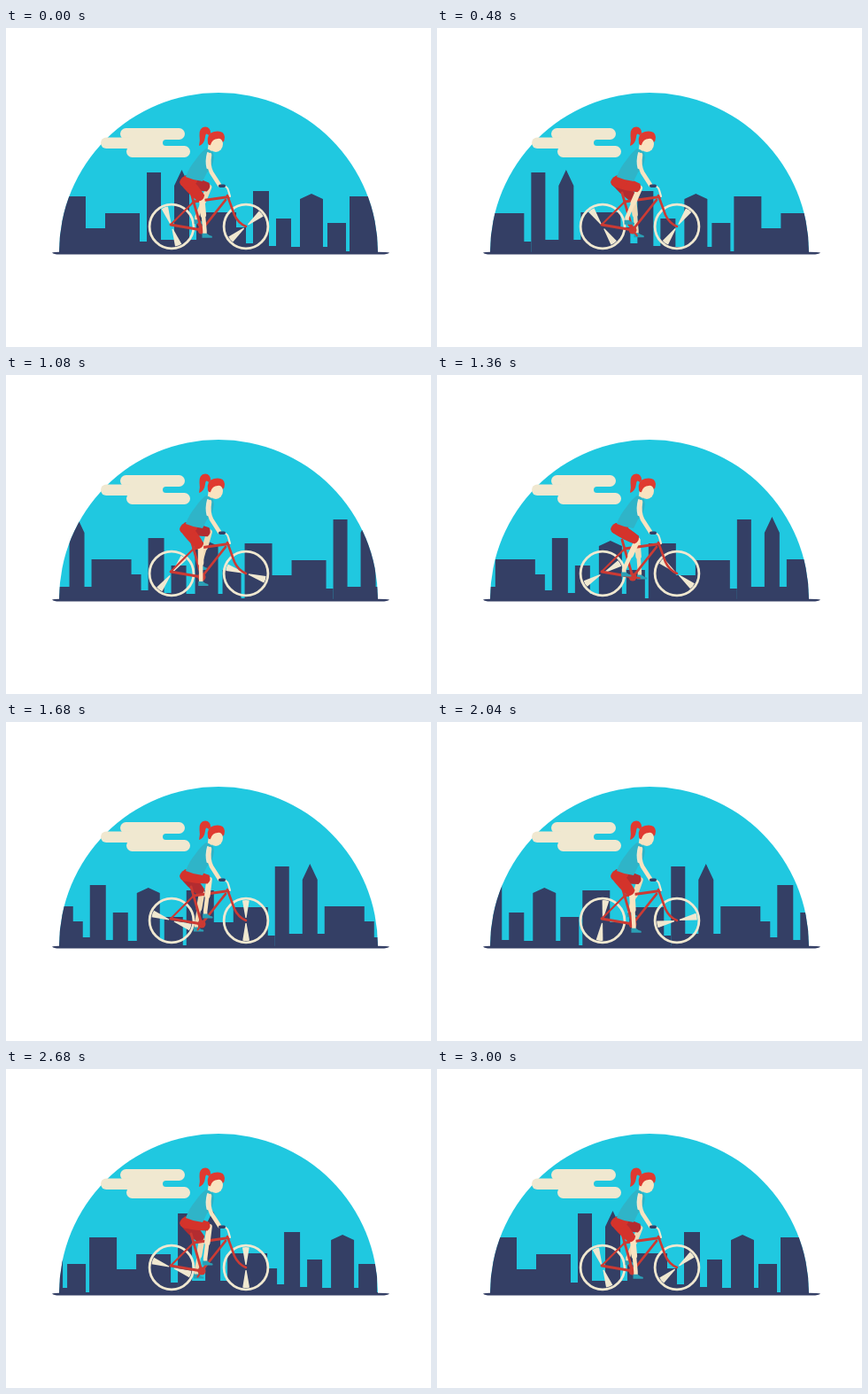
An HTML page with a canvas for the animation above (3040 ms loop, 480 by 360 pixels).

```html
<!DOCTYPE html>
<html>
<head>
<meta charset="utf-8">
<style>
html, body { margin: 0; width: 100%; height: 100%; overflow: hidden; background: #fff; }
canvas { display: block; }
</style>
</head>
<body>
<canvas id="stage" width="480" height="360"></canvas>
<script>
const g = document.getElementById('stage').getContext('2d');
const SKY = '#20c8e0', NAVY = '#343f65', CREAM = '#f0e8d0', RED = '#d4332b',
  DARK_RED = '#b32c30', FRAME = '#cc3a33', HAIR = '#e03a30', SKIN = '#f9e3c0',
  FAR_SKIN = '#f0d9b4', SHIRT = '#2fb4c8', SHOE = '#2a9fb5';
const STEP = 40, FRAMES = 76, TAU = Math.PI * 2, CITY = 329;

// Skyline: right edge, roof height, optional peak height
const roofs = [
  [16, 163], [31, 239], [48, 178, 160], [56, 239], [101, 208], [112, 225], [120, 243],
  [138, 184], [146, 246], [163, 215], [173, 247], [199, 193, 187], [204, 247],
  [225, 220], [229, 252], [260, 190], [282, 226], [321, 209], [329, 241]
];

function line(color, width, ...pts) {
  g.strokeStyle = color;
  g.lineWidth = width;
  g.beginPath();
  pts.forEach(([x, y]) => g.lineTo(x, y));
  g.stroke();
}
function curve(color, width, path) {
  g.strokeStyle = color;
  g.lineWidth = width;
  g.stroke(new Path2D(path));
}
function shape(color, path) {
  g.fillStyle = color;
  g.fill(new Path2D(path));
}
function oval(color, x, y, rx, ry = rx) {
  g.fillStyle = color;
  g.beginPath();
  g.ellipse(x, y, rx, ry, 0, 0, TAU);
  g.fill();
}
function pill(color, x, y, w, h) {
  g.fillStyle = color;
  g.beginPath();
  g.roundRect(x, y, w, h, h / 2);
  g.fill();
}

function city(start) {
  g.fillStyle = NAVY;
  g.beginPath();
  g.moveTo(start, 256);
  let left = start;
  for (const [edge, top, peak] of roofs) {
    const right = start + edge;
    g.lineTo(left, top);
    if (peak) g.lineTo((left + right) / 2, peak);
    g.lineTo(right, top);
    left = right;
  }
  g.lineTo(left, 256);
  g.fill();
}

function backdrop(p) {
  g.save();
  g.beginPath();
  g.arc(240, 253, 180, Math.PI, TAU);
  g.clip();
  g.fillStyle = SKY;
  g.fillRect(0, 0, 480, 360);
  const x = 159 - CITY * p;
  for (let i = -1; i < 3; i++) city(x + i * CITY);
  g.restore();

  pill(CREAM, 129, 113, 73, 13);
  pill(CREAM, 107, 123.5, 60, 12.5);
  pill(CREAM, 136, 133, 72, 13);
  g.fillRect(140, 122, 42, 15);
  pill(SKY, 177, 126, 20, 7);
  shape(NAVY, 'M52 253.5Q54 252.8 60 252.8H420Q431 252.8 433 253.5Q431 255.5 424 255.5H60Q54 255.5 52 253.5Z');
}

function wheel(x, y, degrees) {
  g.save();
  g.translate(x, y);
  g.strokeStyle = CREAM;
  g.lineWidth = 2.8;
  g.beginPath();
  g.arc(0, 0, 24.9, 0, TAU);
  g.stroke();
  g.rotate(degrees * Math.PI / 180);
  for (let i = 0; i < 2; i++) {
    shape(CREAM, 'M3 -0.6L22.5 -3.9Q23.6 0 22.5 3.9L3 0.6Z');
    g.rotate(Math.PI);
  }
  g.restore();
}

// Two-segment leg solved from the hip to a pedal on the crank circle
function leg(angle, red, skin) {
  const hip = [203, 173], thigh = 27, shin = 36;
  const ankle = [220 + 9 * Math.cos(angle), 221 + 9 * Math.sin(angle)];
  const dx = ankle[0] - hip[0], dy = ankle[1] - hip[1], d = Math.hypot(dx, dy);
  const bend = Math.acos(Math.min(1, (thigh ** 2 + d ** 2 - shin ** 2) / (2 * thigh * d)));
  const a = Math.atan2(dy, dx) - bend;
  const knee = [hip[0] + thigh * Math.cos(a), hip[1] + thigh * Math.sin(a)];

  line(skin, 6.5, knee, [(knee[0] + ankle[0]) / 2, (knee[1] + ankle[1]) / 2]);
  line(skin, 4.5, knee, ankle, [ankle[0], ankle[1] + 3]);
  shape(SHOE, `M${ankle[0] - 3} ${ankle[1] + 3}l5 0q3 2.5 6 3q1 1.5 0 2h-11z`);
  g.save();
  g.translate(...hip);
  g.rotate(a);
  shape(red, 'M-2 -6.5Q12 -7.5 26 -5Q30 0 26 5Q12 7.5 -2 6.5Q-8 0 -2 -6.5Z');
  g.restore();
}

function wheels(p) {
  const turn = p * 6 * 360;
  wheel(187, 224, 70 + turn);
  wheel(271, 224, 140 + turn);
}

function frame(angle) {
  const hub = [186, 222], crank = [221, 228];
  line(FRAME, 2.2, hub, [212, 196]);
  line(FRAME, 2.8, hub, crank);
  line(FRAME, 2.8, [209, 186], crank, [248, 194]);
  line(FRAME, 2.8, [212, 196], [252, 190.5]);
  curve(FRAME, 2.6, 'M250 189L258 211Q262 220 271 224');
  curve(CREAM, 2.2, 'M246 178.5Q250 179 251 183L253 190');
  oval(FRAME, ...crank, 4.5);
  const c = 8 * Math.cos(angle), s = 8 * Math.sin(angle);
  line(FRAME, 2, [221 - c, 228 - s], [221 + c, 228 + s]);
}

function rider() {
  shape(RED, 'M202 167L217 170Q215 178 207 180Q197 180 196 174Q197 169 202 167Z');
  line(SKIN, 5, [231, 132], [230, 139]);
  shape(SHIRT, 'M226 136Q235 138 235 146Q234 156 227 163L222 173Q212 172 203 168Q207 157 214 149Q220 140 226 136Z');
  curve(SKIN, 4.6, 'M230 143Q228 155 232 163L241 177');
  curve(CREAM, 2, 'M228 141Q225.5 150 227.5 158');
  pill(NAVY, 240, 176.5, 8, 3.6);

  shape(HAIR, 'M231 119Q231 111.5 225 111.5Q218 112 218.5 121Q219.5 127 218 133Q224 131 225 123Q225.5 117 229 121Z');
  oval(SKIN, 237, 131, 8, 9);
  shape(HAIR, 'M228 130Q226 119 235 117Q246 115 247 123Q247 127 245 129Q243 124 239 125Q233 125 231 132Q229 133 228 130Z');
}

function draw(now) {
  const p = Math.floor(now / STEP) % FRAMES / (FRAMES - 1);
  const pedal = (60 + p * 3 * 360) * Math.PI / 180;
  g.clearRect(0, 0, 480, 360);
  g.lineCap = g.lineJoin = 'round';
  backdrop(p);
  wheels(p);
  leg(pedal + Math.PI, DARK_RED, FAR_SKIN);
  frame(pedal);
  leg(pedal, RED, SKIN);
  rider();
}

const begin = performance.now();
function tick() {
  draw(performance.now() - begin);
  requestAnimationFrame(tick);
}
tick();
</script>
</body>
</html>
```
